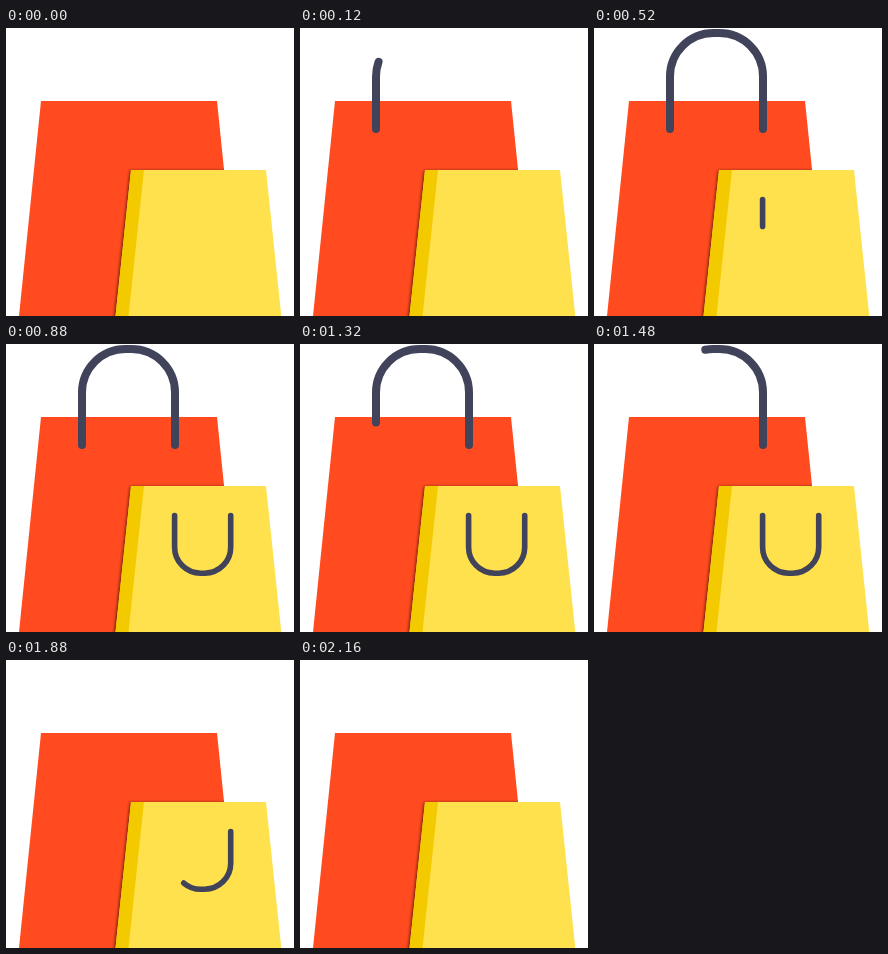
These frames come from a looping animation (288x288 px, 2.2 s). An HTML page:

```html
<!DOCTYPE html>
<html lang="en">
<head>
<meta charset="utf-8">
<title>Shopping bags</title>
<style>
  html, body { margin: 0; width: 100%; height: 100%; overflow: hidden; background: #fff; }
  svg { display: block; width: 100vw; height: 100vh; }
  .handle { fill: none; stroke: #40435a; stroke-linecap: round; }
</style>
</head>
<body>
<svg viewBox="0 0 288 288">
  <defs>
    <clipPath id="bigBag"><path d="M35 73H211L233 288H13Z"/></clipPath>
    <filter id="soft" x="-10%" y="-10%" width="120%" height="120%">
      <feGaussianBlur stdDeviation="1.6"/>
    </filter>
  </defs>
  <path fill="#ff4b1f" d="M35 73H211L233 288H13Z"/>
  <g clip-path="url(#bigBag)">
    <path fill="#000" opacity=".6" filter="url(#soft)" d="M124 142.5H260L277 300H107Z"/>
  </g>
  <path fill="#ffe14d" d="M125 142H260L275.3 288H109.5Z"/>
  <path fill="#f3ca00" d="M125 142H138L122.5 288H109.5Z"/>
  <path id="big" class="handle" pathLength="1" stroke-width="8"
    d="M76 101V48.5A43.5 43.5 0 0 1 119.5 5H125.5A43.5 43.5 0 0 1 169 48.5V101"/>
  <path id="small" class="handle" pathLength="1" stroke-width="5.6"
    d="M168.6 171.5V203.2A26 26 0 0 0 194.6 229.2H198.7A26 26 0 0 0 224.7 203.2V171.5"/>
</svg>
<script>
  const LOOP = 2200, STEP = 40, SWEEP = 440;
  const handles = [
    { el: document.getElementById('big'), drawAt: 0, eraseAt: 1280 },
    { el: document.getElementById('small'), drawAt: 440, eraseAt: 1720 }
  ];
  const progress = (t, from) => Math.min(1, Math.max(0, (t - from) / SWEEP));

  function render(time) {
    const t = Math.floor((time % LOOP) / STEP) * STEP;
    for (const { el, drawAt, eraseAt } of handles) {
      const head = progress(t, drawAt);
      const tail = progress(t, eraseAt);
      const length = head - tail;
      el.style.visibility = length > 0 ? 'visible' : 'hidden';
      el.setAttribute('stroke-dasharray', `${length} 2`);
      el.setAttribute('stroke-dashoffset', -tail);
    }
  }

  const start = performance.now();
  function tick() {
    render(performance.now() - start);
    requestAnimationFrame(tick);
  }
  tick();
</script>
</body>
</html>
```
